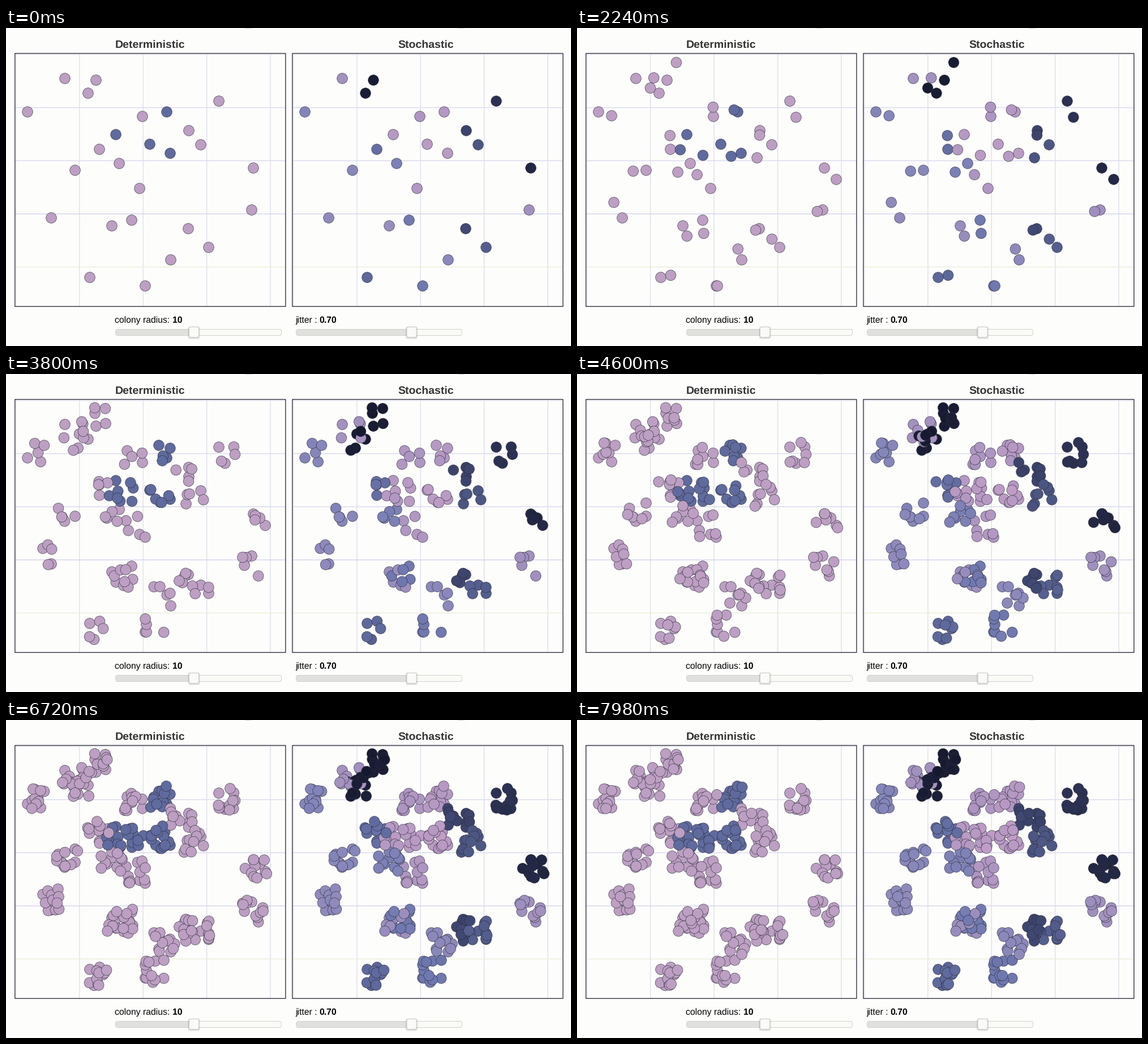
A matplotlib script for the animation above (8 s loop, 998 by 561 pixels).

```python
import numpy as np
import matplotlib.pyplot as plt
from matplotlib.animation import FuncAnimation
from matplotlib.colors import LinearSegmentedColormap, to_rgba
from matplotlib.patches import Ellipse, FancyBboxPatch, Rectangle

W, H, DPI = 998, 561, 100
PX = 72 / DPI
LOOP, INTERVAL = 8000, 40
SHIFT = 490                      # offset from the left panel to the right one

plt.rcParams["font.family"] = "Liberation Sans"
plt.rcParams["text.hinting"] = "none"

# founder x, y, trait value, direction of the colony's centre in degrees
FOUNDERS = np.array([
    (104, 89, .85, 40), (159, 92, .03, 280), (145, 115, .03, 160),
    (38, 148, .69, 335), (376, 129, .17, 35), (241, 156, .90, 215),
    (284, 148, .92, 235), (323, 181, .28, 215), (194, 188, .93, 80),
    (254, 205, .95, 170), (344, 206, .40, 150), (290, 221, .95, 235),
    (165, 214, .53, 265), (200, 239, .66, 140), (122, 251, .71, 200),
    (236, 283, .91, 235), (437, 247, .10, 70), (434, 321, .84, 90),
    (80, 335, .75, 270), (187, 349, .80, 45), (222, 339, .60, 135),
    (322, 354, .32, 90), (358, 387, .44, 225), (291, 409, .73, 235),
    (148, 440, .49, 45), (246, 455, .59, 320)])
LEAN, REACH = 17, 20.5           # distance to the centre, half side of a colony
BLUE_ABOVE = .915                # trait value that turns a colony blue

STEP = 840
BIRTHS = [0, 1, 1, 2, 3, 1, 1, 2, 1, 1]
BIRTH_DELAY, BIRTH_TIME = 600, 80

TONES = LinearSegmentedColormap.from_list("tones", [
    (0, "#14182e"), (.2, "#2f365a"), (.4, "#4c5683"), (.5, "#5f6a9e"),
    (.6, "#7079b0"), (.7, "#8586ba"), (.85, "#a391bf"), (1, "#c59fc7")])
PINK, BLUE = to_rgba("#bd9fc3"), to_rgba("#5f6a9e")
EDGE = to_rgba("#2d2d3a", .75)


def build_cells():
    """Positions, colours for both panels and birth times, oldest first."""
    rng = np.random.default_rng(10)
    x, y, trait, heading = FOUNDERS.T
    angle = np.radians(heading)
    centres = np.column_stack([x + LEAN * np.cos(angle),
                               y + LEAN * np.sin(angle)])
    births = [k * STEP + BIRTH_DELAY
              for k, count in enumerate(BIRTHS) for _ in range(count)]
    shape = (len(births), len(FOUNDERS))

    children = centres + rng.uniform(-REACH, REACH, shape + (2,))
    points = np.vstack([FOUNDERS[:, :2], children.reshape(-1, 2)])
    fixed = np.where(trait[:, None] > BLUE_ABOVE, BLUE, PINK)
    traits = np.vstack([trait, trait + rng.normal(0, .012, shape)])
    born = np.repeat([-STEP] + births, len(FOUNDERS))
    return (points, np.tile(fixed, (len(births) + 1, 1)),
            TONES(np.clip(traits, 0, 1).ravel()), born)


fig = plt.figure(figsize=(W / DPI, H / DPI), dpi=DPI, facecolor="#fdfdfc")
ax = fig.add_axes([0, 0, 1, 1])
ax.set_xlim(0, W)
ax.set_ylim(H, 0)
ax.axis("off")


def line(x0, y0, x1, y1, color, width=1.4):
    ax.plot([x0, x1], [y0, y1], color=color, lw=width * PX, zorder=1,
            solid_capstyle="butt", snap=False)


def rounded(x, y, w, h, r, face, edge="none", z=3):
    ax.add_patch(FancyBboxPatch((x, y), w, h, fc=face, ec=edge, lw=PX, zorder=z,
                                boxstyle=f"round,pad=0,rounding_size={r}"))


def label(x, y, text, size, color="black", **kw):
    ax.text(x, y, text, fontsize=size * PX, color=color, va="baseline", **kw)


def panel(left, title, title_x):
    width, top, bottom = 478, 44.8, 491.3
    line(left + 2, top, left + 2, bottom, "#e6e6f2")
    for k in range(4):
        x = left + 114 + 112.4 * k
        line(x, top, x, bottom, "#dfdfee")
    line(left, 46.8, left + width, 46.8, "#e6e6f2")
    for k, color in enumerate(("#dadaef", "#dadaef", "#d3d3f0", "#ecefd8")):
        y = 140.5 + 93.7 * k
        line(left, y, left + width, y, color)
    ax.add_patch(Rectangle((left, top), width, bottom - top, fill=False,
                           ec="#343442", lw=1.4 * PX, zorder=2, snap=False))
    label(title_x, 35, title, 19.5, "#333333", weight="bold", ha="center")


def slider(left, knob, text, value, value_x):
    label(left - .8, 520, text, 15.8)
    label(value_x, 520, value, 15.8, weight="bold")
    rounded(left + .5, 531.5, 293, 11, 4, "#fafaf7", "#d2d2ca")
    rounded(left + 1, 532, knob - left, 10, 3.5, "#e0e0de")
    for grow, shade in ((2, .05), (1, .09)):
        rounded(knob - 9 - grow, 528 - grow, 18 + 2 * grow, 19 + 2 * grow,
                4, (0, 0, 0, shade), z=4)
    rounded(knob - 8.5, 527.5, 17, 18, 3, "#fafaf8", "#cfcfca", z=5)


panel(15.8, "Deterministic", 254.5)
panel(15.8 + SHIFT, "Stochastic", 741.7)
slider(193, 332, "colony radius:", "10", 294.2)
slider(512, 716.5, "jitter :", "0.70", 553.5)
for x in (428, 804):
    ax.add_patch(Ellipse((x, -1), 17, 4, fc="#d2d2ce", ec="none"))

points, fixed_colors, tone_colors, birth = build_cells()
offsets = np.vstack([points, points + (SHIFT, 0)])
colors = np.vstack([fixed_colors, tone_colors])
birth = np.tile(birth, 2)
dots = ax.scatter([], [], s=(18.6 * PX) ** 2, linewidths=.8 * PX, zorder=6)


def draw(i):
    alpha = np.clip((i * INTERVAL - birth) / BIRTH_TIME, 0, 1)
    seen = alpha > 0
    face = colors[seen].copy()
    face[:, 3] = alpha[seen]
    edge = np.tile(EDGE, (seen.sum(), 1))
    edge[:, 3] *= alpha[seen]
    dots.set_offsets(offsets[seen])
    dots.set_facecolor(face)
    dots.set_edgecolor(edge)
    return (dots,)


anim = FuncAnimation(fig, draw, frames=LOOP // INTERVAL, interval=INTERVAL,
                     init_func=lambda: draw(0), repeat=True, repeat_delay=0)
plt.show()
```
